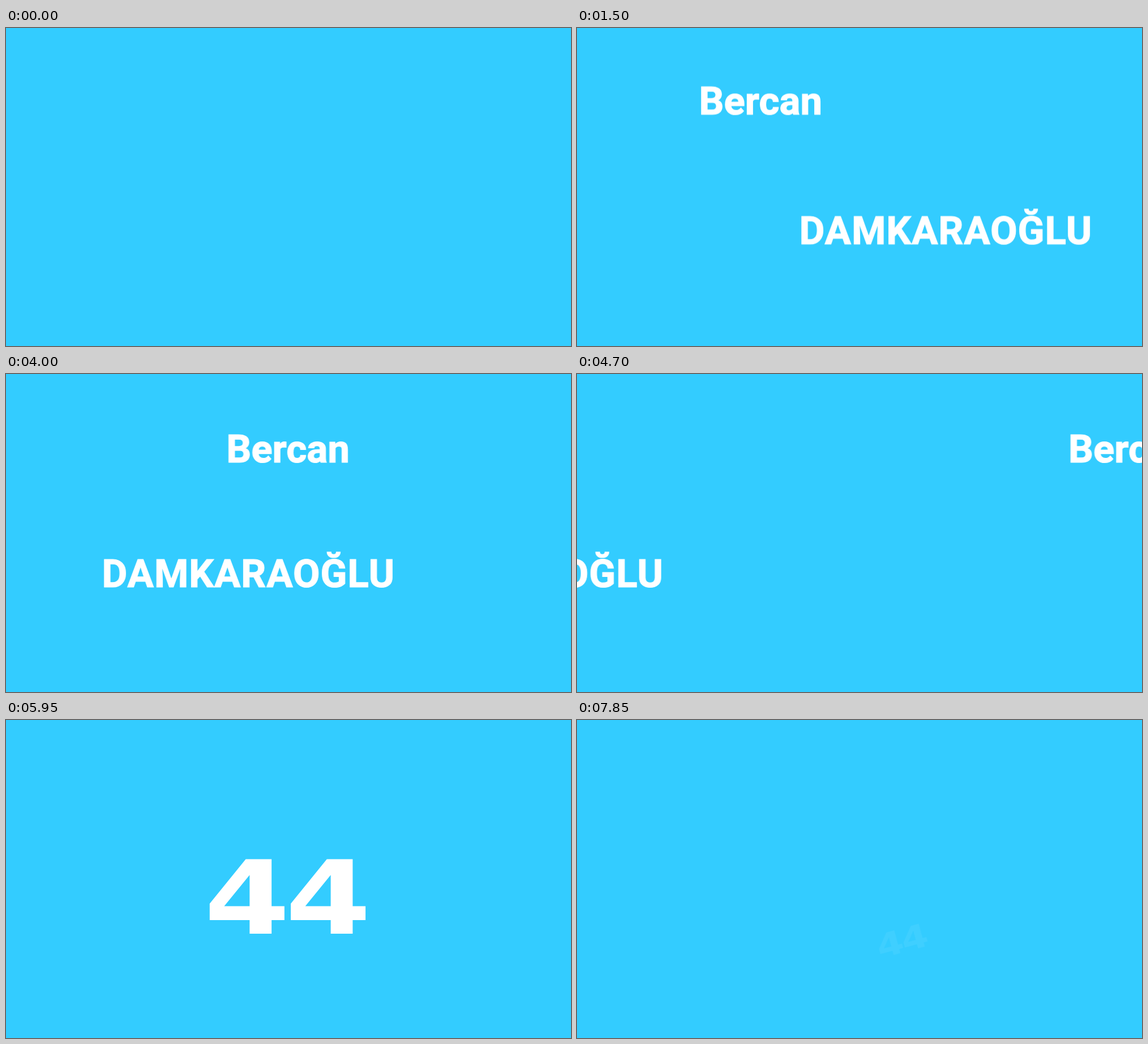
Animation, 998 px wide and 561 px high, one loop 8000 ms. Source, as an HTML page:

```html
<!DOCTYPE html>
<html lang="tr">
<head>
<meta charset="utf-8">
<title>44</title>
<style>
  html, body {
    margin: 0;
    width: 100%;
    height: 100%;
    overflow: hidden;
    background: #3cf;
  }
  svg {
    display: block;
    width: 998px;
    height: 561px;
    fill: #fff;
  }
  .name {
    font: 700 69px Roboto, sans-serif;
    stroke: #fff;
    stroke-width: 1.2px;
  }
  .last .name { letter-spacing: .9px; }
  .age {
    font: 700 179.7px "DejaVu Sans", sans-serif;
    letter-spacing: -7.2px;
  }
  .first, .last, .spin {
    animation: first 8s infinite;
    transform-origin: 0 0;
  }
  .last { animation-name: last; }
  .spin { animation-name: spin; }

  /* Every move advances once per 50 ms. */
  @keyframes first {
    0% { transform: translate(-604.5px, -15px); animation-timing-function: steps(39); }
    24.375%, 49.375% { transform: translate(0px, 0px); animation-timing-function: steps(20); }
    61.875%, 100% { transform: translate(684px, 0px); }
  }
  @keyframes last {
    0% { transform: translate(802px, 23px); animation-timing-function: steps(39); }
    24.375%, 49.375% { transform: translate(0px, 0px); animation-timing-function: steps(20); }
    61.875%, 100% { transform: translate(-763px, 0px); }
  }
  @keyframes spin {
    0%, 61.875% {
      transform: translate(-55px, -36px) rotate(5deg) scale(2.3);
      opacity: 0;
      animation-timing-function: steps(20);
    }
    74.375%, 86.875% {
      transform: translate(0px, 0px) rotate(0deg) scale(1);
      opacity: 1;
      animation-timing-function: steps(18);
    }
    98.125%, 100% {
      transform: translate(77px, 78.5px) rotate(-15deg) scale(.313);
      opacity: .06;
    }
  }
</style>
</head>
<body>
<svg viewBox="0 0 998 561">
  <g class="first"><text class="name" x="355" y="155.5">Bercan</text></g>
  <g class="last"><text class="name" x="207.5" y="375.5">DAMKARAOĞLU</text></g>
  <g transform="translate(497.5 311.5)">
    <g class="spin"><text class="age" x="-121.4" y="65" transform="scale(1.214 1)">44</text></g>
  </g>
</svg>
</body>
</html>
```
